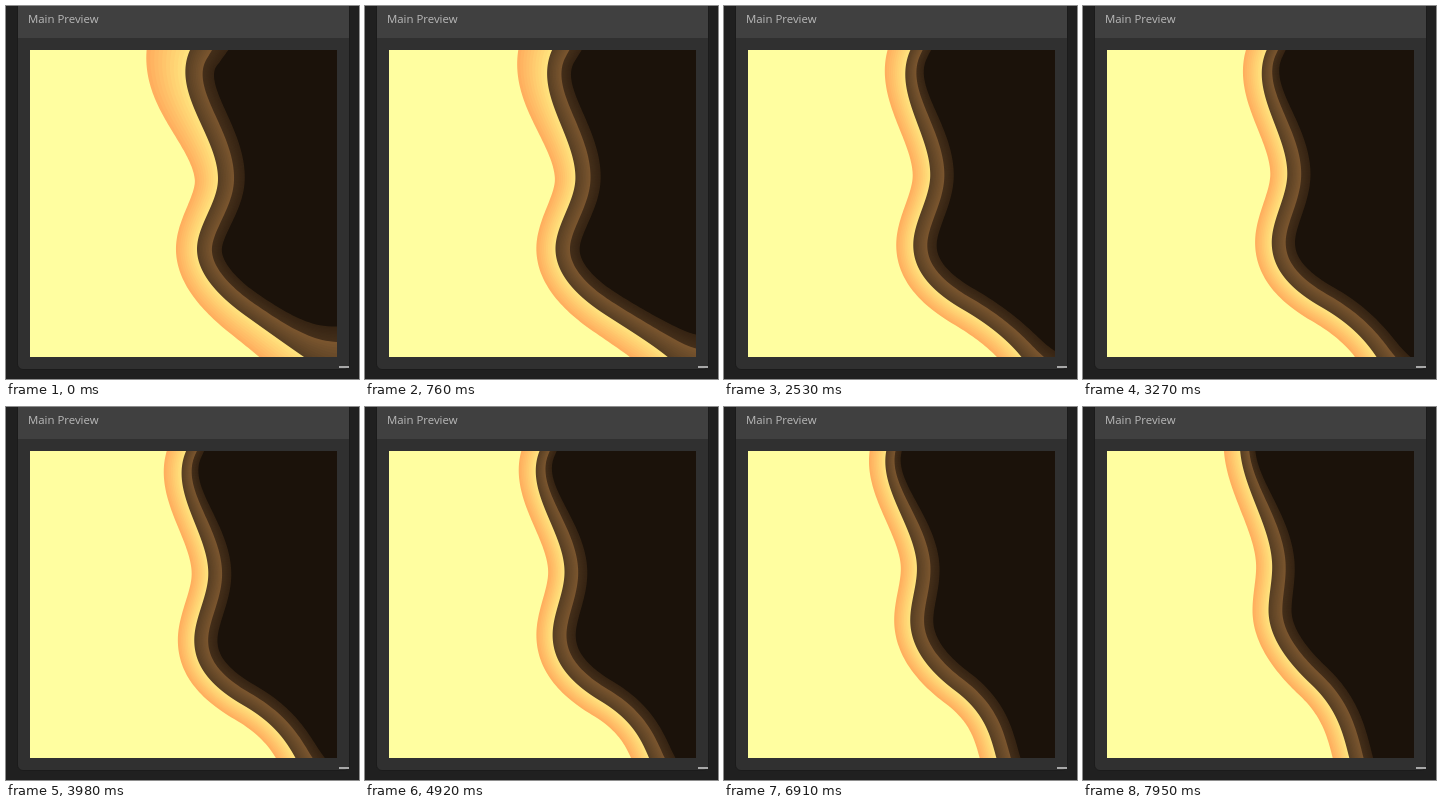
Animation of 353x373 px, one loop 8 s. Source, as an HTML page with a canvas:

```html
<!DOCTYPE html>
<html lang="en">
<head>
<meta charset="utf-8">
<title>Main Preview</title>
<style>
  html, body { margin: 0; width: 100%; height: 100%; overflow: hidden; background: #202020; }
  body { position: relative; }
  .panel {
    position: absolute; left: 11px; top: -8px; width: 331px; height: 370px;
    background: #303030; border: 1px solid #1b1b1b; border-radius: 6px; overflow: hidden;
  }
  .header { position: absolute; left: 0; top: 0; width: 100%; height: 39px; background: #404040; }
  .title {
    position: absolute; left: 22px; top: 5px; color: #b9b9b9;
    font: 11.4px/16px "Open Sans", sans-serif; white-space: nowrap;
  }
  canvas { position: absolute; left: 24px; top: 44px; }
  .grip { position: absolute; left: 333px; top: 360px; width: 10px; height: 2px; background: #a8a8a8; }
</style>
</head>
<body>
<div class="panel"><div class="header"></div></div>
<div class="title">Main Preview</div>
<canvas id="view" width="307" height="307"></canvas>
<div class="grip"></div>
<script>
const LOOP = 8000, TOP = 44, BOTTOM = 351, SHADES = 10;
const ctx = document.getElementById('view').getContext('2d');
ctx.translate(-24, -TOP);

const mix = (a, b, k) => a + (b - a) * k;
const rgb = (from, to, k) => `rgb(${from.map((v, i) => Math.round(mix(v, to[i], k)))})`;

// Knots of the main edge at progress u: position and slope dx/dy.
function knotsAt(u) {
  const u2 = u * u;
  return [
    { x: 184 + 45 * u - 140 * u2 + 68 * u2 * u, y: TOP, m: 0.55 * u ** 5 - 0.45 },
    { x: 212 - 16 * u - 7 * u2, y: 173 - 13 * u, m: 0 },
    { x: 191 - 5.5 * u, y: 243 - 40 * u2, m: 0 },
    { x: 240 - 12 * u2, y: 310 - 15 * u - 18 * u2, m: 1.4 + 1.7 * u - 2.05 * u2 },
    { x: 313 - 47 * u - 15 * Math.exp(-10 * u), y: BOTTOM, m: 0.25 + 1.2 * (1 - u) ** 2 }
  ];
}

// Cubic Hermite curve through the knots, straight beyond both ends.
function edgeX(knots, y) {
  const first = knots[0], last = knots[knots.length - 1];
  if (y <= first.y) return first.x + first.m * (y - first.y);
  if (y >= last.y) return last.x + last.m * (y - last.y);
  const i = knots.findIndex(k => k.y > y), p = knots[i - 1], q = knots[i];
  const h = q.y - p.y, s = (y - p.y) / h, r = 1 - s;
  return mix(p.x, q.x, s * s * (3 - 2 * s)) + h * s * r * (r * p.m - s * q.m);
}

// Points along the main edge with unit normals and the widths on both sides.
function outlineAt(u) {
  const knots = knotsAt(u), early = Math.exp(-5 * u), points = [];
  for (let y = TOP - 50; y <= BOTTOM + 50; y += 2) {
    const slope = (edgeX(knots, y + 1) - edgeX(knots, y - 1)) / 2;
    const length = Math.hypot(1, slope);
    const flare = 28 * early * Math.exp((TOP - y) / 90);
    points.push({
      x: edgeX(knots, y), y, nx: 1 / length, ny: -slope / length,
      left: 16 + flare + 12 * early * Math.exp((y - BOTTOM) / 60),
      right: 23 - 8 * Math.exp(-(((y - TOP) / 70) ** 2)) + 0.6 * flare
        + 14 * early * Math.exp((y - BOTTOM) / 15)
    });
  }
  return points;
}

// Fill everything to the right of the outline shifted by offset:
// -1 is the outer glow, 0 the main edge, 1 the start of the dark area.
function fillRight(points, offset, color) {
  ctx.beginPath();
  for (const p of points) {
    const d = offset * (offset < 0 ? p.left : p.right);
    ctx.lineTo(p.x + p.nx * d, p.y + p.ny * d);
  }
  ctx.lineTo(900, BOTTOM + 50);
  ctx.lineTo(900, TOP - 150);
  ctx.fillStyle = color;
  ctx.fill();
}

const bands = [
  { from: -1, to: 0, start: [255, 174, 94], end: [255, 226, 124] },
  { from: 0, to: 0.6, start: [87, 63, 36], end: [122, 85, 46] },
  { from: 0.6, to: 1, start: [67, 46, 26], end: [54, 36, 19] }
];

function draw(t) {
  const points = outlineAt(t / LOOP);
  ctx.fillStyle = '#fffea0';
  ctx.fillRect(0, 0, 400, 400);
  for (const { from, to, start, end } of bands)
    for (let i = 0; i < SHADES; i++)
      fillRight(points, mix(from, to, i / SHADES), rgb(start, end, i / (SHADES - 1)));
  fillRight(points, 1, '#1b120a');
}

function frame() {
  draw(performance.now() % LOOP);
  requestAnimationFrame(frame);
}
frame();
</script>
</body>
</html>
```
